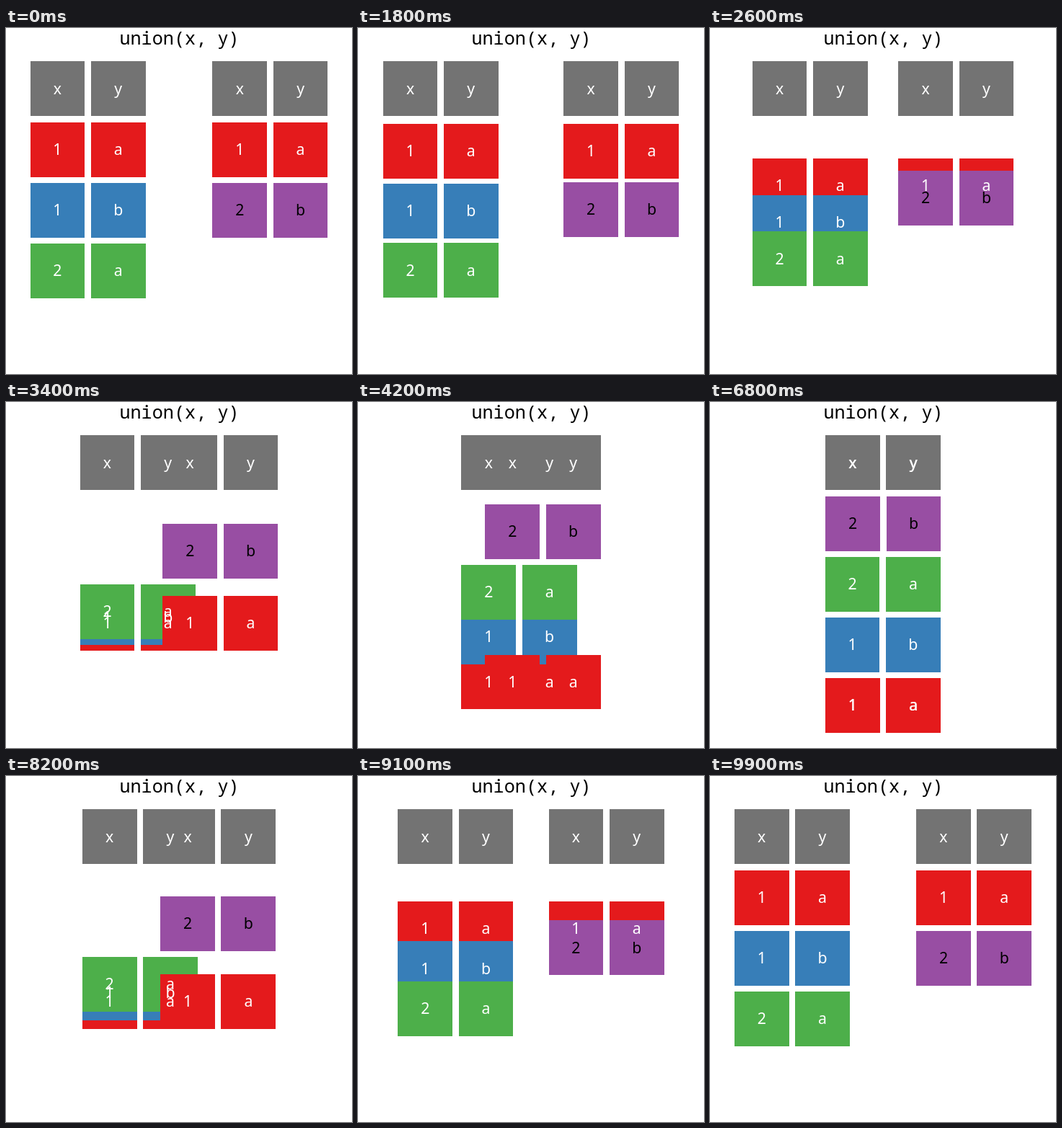
An HTML page with a canvas for the animation above (10000 ms loop, 480 px wide and 480 px high).

```html
<!DOCTYPE html>
<html lang="en">
<head>
<meta charset="utf-8">
<title>union(x, y)</title>
<style>
  html, body { margin: 0; width: 100%; height: 100%; overflow: hidden; background: #fff; }
  canvas { display: block; }
</style>
</head>
<body>
<canvas id="stage" width="480" height="480"></canvas>
<script>
const ctx = document.getElementById('stage').getContext('2d');
const PITCH = 84.28, HALF = 0.45 * PITCH, TOP = 84.303;
const GREY = '#737373', RED = '#e41a1c', BLUE = '#377eb8', GREEN = '#4daf4a', PURPLE = '#984ea3';

// side (-1 left table, 1 right table), first slot, last slot, fill, cell texts
const rows = [
  [-1, 0, 0, GREY, 'xy'],
  [-1, 1, 4, RED, '1a'],
  [-1, 2, 3, BLUE, '1b'],
  [-1, 3, 2, GREEN, '2a'],
  [1, 0, 0, GREY, 'xy'],
  [1, 1, 4, RED, '1a'],
  [1, 2, 1, PURPLE, '2b']
];

const ease = t => (1 - Math.cos(Math.PI * Math.min(1, Math.max(0, t)))) / 2;

// 0 = two separate tables, 1 = merged table; advances in 100 ms steps
function merged(ms) {
  const step = Math.floor(ms % 10000 / 100);
  return step < 67 ? ease((step - 16) / 34) : 1 - ease((step - 67) / 33);
}

function tile(x, y, fill) {
  const left = Math.round(x - HALF), top = Math.round(y - HALF);
  ctx.fillStyle = fill;
  ctx.fillRect(left, top, Math.round(x + HALF) - left, Math.round(y + HALF) - top);
}

function draw(ms) {
  const p = merged(ms);
  const cells = rows.flatMap(([side, from, to, fill, texts]) =>
    [...texts].map((text, col) => ({
      x: 240 + PITCH * (col - 0.5 + side * 1.5 * (1 - p)),
      y: TOP + PITCH * (from + (to - from) * p),
      fill, text
    })));

  ctx.fillStyle = '#fff';
  ctx.fillRect(0, 0, 480, 480);
  ctx.textAlign = 'center';

  ctx.fillStyle = '#000';
  ctx.font = '25.2px "Noto Sans Mono", "DejaVu Sans Mono", monospace';
  ctx.fillText('union(x, y)', 240.5, 23);

  for (const c of cells) tile(c.x, c.y, c.fill);
  ctx.font = '21.3px "Noto Sans", "Open Sans", sans-serif';
  for (const c of cells) {
    ctx.fillStyle = c.fill === PURPLE ? '#000' : '#fff';
    ctx.fillText(c.text, c.x, c.y + 7.2);
  }
}

function tick(now) {
  draw(now);
  requestAnimationFrame(tick);
}
draw(0);
requestAnimationFrame(tick);
</script>
</body>
</html>
```
